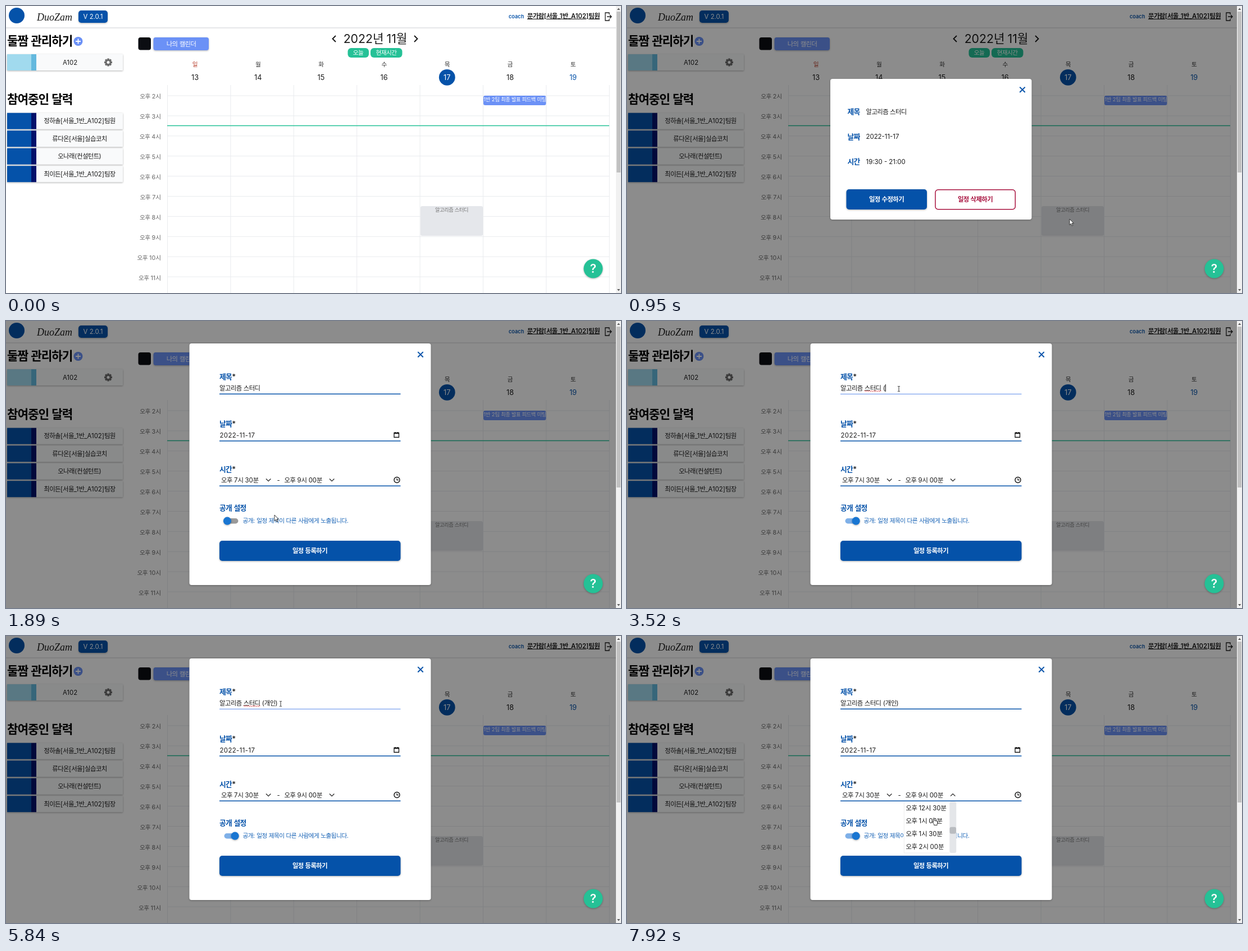
Write an HTML page that moves like this. It is 1095 by 512 pixels and loops after 8 s.

```html
<!DOCTYPE html>
<html lang="ko">
<head>
<meta charset="utf-8">
<style>
  html, body { margin: 0; width: 100%; height: 100%; overflow: hidden; background: #fff; }
  svg { display: block; width: 100%; height: 100%; }
  text { font-family: Inter, 'Noto Sans CJK KR', 'Noto Sans CJK', sans-serif; font-optical-sizing: none; white-space: pre; }
  .hangul { letter-spacing: -.052em; }
  .script { font-family: 'Liberation Serif', serif; font-style: italic; }
  .mid { text-anchor: middle; }
  .end { text-anchor: end; }
  .link { text-decoration: underline; }
  .date { letter-spacing: .035em; }
  .raised { filter: drop-shadow(0 1px 1.5px rgba(0, 0, 0, .3)); }
  .stroke { fill: none; }
</style>
</head>
<body>
<svg id="stage" viewBox="0 0 1095 512"></svg>
<script>
const LOOP = 8000;
const BLUE = '#0552a9', NAVY = '#02116b', SOFT = '#6b91f6', GREEN = '#25c196';
const RED = '#a8123f', INK = '#1b1b1b', GRAY = '#686868';
const BASE = 11.4, SMALL = 10.7, TINY = 9.3, LABEL = 12.8, TITLE = 21.3;

const wrapHangul = s => s.replace(/[ㄱ-ㅎ가-힣]+/g, '<tspan class="hangul">$&</tspan>');

// y is the vertical centre of the line
const text = (x, y, s, size = BASE, fill = INK, cls = '', weight = 400) =>
  `<text x="${x}" y="${y + size * .37}" font-size="${size}" fill="${fill}" class="${cls}" font-weight="${weight}">${wrapHangul(s)}</text>`;
const rect = (x, y, w, h, fill, r = 0, cls = '') =>
  `<rect x="${x}" y="${y}" width="${w}" height="${h}" rx="${r}" fill="${fill}" class="${cls}"/>`;
const circle = (x, y, r, fill, cls = '') =>
  `<circle cx="${x}" cy="${y}" r="${r}" fill="${fill}" class="${cls}"/>`;
const line = (d, color, width = 1) =>
  `<path class="stroke" d="${d}" stroke="${color}" stroke-width="${width}"/>`;
const cross = (x, y, r) => line(`M${x - r} ${y - r}l${2 * r} ${2 * r}m0 ${-2 * r}l${-2 * r} ${2 * r}`, BLUE, 2);
const group = (id, body) => `<g id="${id}">${body}</g>`;
const range = (n, fn) => Array.from({ length: n }, (_, i) => fn(i)).join('');

function header() {
  return rect(0, 38, 1086, 2, '#e6e7e9') +
    circle(19, 17, 14, BLUE) +
    text(55, 19, 'DuoZam', 18, INK, 'script') +
    rect(129, 8, 52, 22, BLUE, 5, 'raised') +
    text(155, 19, 'V 2.0.1', BASE, '#fff', 'mid') +
    text(895, 18.5, 'coach', 9.2, BLUE, '', 600) +
    text(928, 17.5, '문가람[서울_1반_A102]팀원', BASE, INK, 'link', 600) +
    line('M1074 15v-3h-7v14h7v-3M1070 19h8m-3-3l3 3l-3 3', INK, 1.3);
}

function member(name, i) {
  const y = 190.7 + 31.5 * i;
  return rect(2, y, 206, 29, '#f9fafb', 1, 'raised') + rect(2, y, 43, 29, BLUE) +
    rect(45, y, 9, 29, NAVY) + text(131, y + 14.5, name, BASE, INK, 'mid');
}

function sidebar() {
  const teeth = range(8, i => `<rect x="-1.7" y="-7" width="3.4" height="4" transform="rotate(${i * 45})"/>`);
  return text(2, 62.5, '둘짬 관리하기', TITLE, '#000', '', 600) +
    circle(128.5, 63, 8, SOFT) + line('M124 63h9m-4.5-4.5v9', '#fff', 1.8) +
    rect(2, 86, 206, 29, '#f9fafb', 1, 'raised') + rect(2, 86, 43, 29, '#a1daee') + rect(45, 86, 9, 29, '#64b9de') +
    text(114, 100.5, 'A102', BASE, INK, 'mid') +
    `<g transform="translate(182 100.5)" fill="#6b6b6b">${teeth}<circle r="4" class="stroke" stroke="#6b6b6b" stroke-width="3"/></g>` +
    text(2, 166.5, '참여중인 달력', TITLE, '#000', '', 600) +
    ['정하솔[서울_1반_A102]팀원', '류다온[서울]실습코치', '오나래(컨설턴트)', '최이든[서울_1반_A102]팀장'].map(member).join('');
}

function dayHead(i) {
  const x = 336.5 + 112.2 * i, today = i === 4;
  const color = today ? '#fff' : i === 6 ? BLUE : INK;
  return text(x, 104, '일월화수목금토'[i], SMALL, i ? '#333' : '#b8402f', 'mid') +
    (today ? circle(x, 127.3, 14.4, BLUE) : '') +
    text(x, 127, String(13 + i), LABEL, color, 'mid');
}

function calendar() {
  return rect(235.5, 56, 22.5, 22.5, '#0b0d12', 4) +
    rect(262.5, 56, 98.5, 23, SOFT, 4, 'raised') + text(312, 67.3, '나의 캘린더', BASE, '#fff', 'mid') +
    line('M587 53l-5.5 5.5l5.5 5.5M727 53l5.5 5.5l-5.5 5.5', '#111', 1.8) +
    text(657, 58.5, '2022년 11월', TITLE, INK, 'mid') +
    rect(608.5, 75, 37.5, 17, GREEN, 6) + text(627, 83.5, '오늘', SMALL, '#fff', 'mid') +
    rect(649, 75, 56.5, 17, GREEN, 6) + text(677, 83.5, '현재시간', SMALL, '#fff', 'mid') +
    range(7, dayHead) +
    range(8, i => line(`M${287.5 + 112.4 * i} 141V512`, '#e9ebee')) +
    range(10, i => {
      const y = 160 + 35.9 * i;
      return line(`M287.5 ${y}H1074`, '#e9ebee') + text(275.5, y + 1.5, `오후 ${i + 2}시`, SMALL, GRAY, 'end');
    }) +
    line('M287 213.5H1074', GREEN, 1.4) +
    rect(850, 160, 111.5, 17, SOFT, 3) + text(906, 167, '1반 2팀 최종 발표 피드백 미팅', TINY, '#fff', 'mid') +
    rect(738, 357, 111, 53, '#e5e7eb', 3) + text(793.5, 364, '알고리즘 스터디', TINY, '#777', 'mid');
}

function chrome() {
  return circle(1045.5, 468.5, 17, GREEN, 'raised') + text(1045.5, 468.5, '?', 21, '#fff', 'mid', 600) +
    rect(1086, 0, 9, 512, '#f1f1f1') + rect(1087.2, 10, 7, 287, '#c1c1c1') +
    '<path d="M1088 7l2.7-3.5l2.7 3.5zM1088 505l2.7 3.5l2.7-3.5z" fill="#606060"/>';
}

function details() {
  const row = (y, label, value, weight) =>
    text(392.5, y, label, LABEL, BLUE, '', 600) + text(425.5, y, value, BASE, INK, '', weight);
  return rect(362, 130, 358.5, 251, '#fff', 4, 'raised') + cross(704, 149.3, 4.7) +
    row(188.5, '제목', '알고리즘 스터디', 500) +
    row(232.8, '날짜', '2022-11-17', 400) +
    row(277.5, '시간', '19:30 - 21:00', 400) +
    rect(390.5, 327, 143.5, 36, BLUE, 5, 'raised') + text(462, 345, '일정 수정하기', BASE, '#fff', 'mid', 600) +
    `<rect x="549" y="327.8" width="142.3" height="35" rx="5" fill="#fff" stroke="${RED}" stroke-width="1.5"/>` +
    text(620, 345, '일정 삭제하기', BASE, RED, 'mid', 600);
}

function form() {
  const label = (y, s, star = '<tspan fill="#222">*</tspan>') => text(380, y, s + star, LABEL, BLUE, '', 600);
  const underline = y => line(`M380 ${y}H702.5`, BLUE, 1.5);
  return rect(326.5, 40, 430, 431, '#fff', 4, 'raised') + cross(738, 59.8, 4.7) +
    label(99, '제목') + label(183.5, '날짜') + label(264, '시간') + label(333, '공개 설정', '') +
    '<g id="field"></g><path id="titleLine" class="stroke" d="M380 130.3H702.5"/>' +
    line('M422.5 125q1-2 2 0' + 't2 0'.repeat(14), '#d33', .9).replace('<path', '<path id="spelling"') +
    '<rect id="caret" y="113" width="1" height="13" fill="#000"/>' +
    text(380.5, 203.5, '2022-11-17', BASE, INK, 'date') + underline(214) +
    line('M691 199.5h8.5v8h-8.5zM691 200.5h8.5M693 198v2m4.5-2v2', '#111', 1.3) +
    text(383, 283.5, '오후 7시 30분') + line('M463 281.5l4.2 4.2l4.2-4.2', '#222', 1.2) +
    text(485, 283.5, '-', BASE, INK, 'mid') + text(495.5, 283.5, '오후 9시 00분') +
    '<path id="chevron" class="stroke" stroke="#222" stroke-width="1.2"/>' +
    '<circle cx="696" cy="283.5" r="5" class="stroke" stroke="#111" stroke-width="1.4"/>' +
    line('M696 280.5v3.2h3', '#111', 1.2) + underline(294.3) +
    '<rect id="track" x="388.5" y="352" width="25" height="9.5" rx="4.7"/>' +
    '<circle id="knob" cy="356.7" r="7.1" fill="#1976d2" class="raised"/>' +
    text(421.5, 356.3, '공개: 일정 제목이 다른 사람에게 노출됩니다.', SMALL, '#1763b6') +
    rect(380, 392, 322.5, 36, BLUE, 5, 'raised') + text(541, 410, '일정 등록하기', BASE, '#fff', 'mid', 600);
}

const ITEM = 22.8, ITEMS = 48, LIST_TOP = 295.5, LIST_HEIGHT = 91.5;

function timeList() {
  const item = i => {
    const hour = i >> 1;
    return text(496.5, 307 + ITEM * i, `${hour < 12 ? '오전' : '오후'} ${hour % 12 || 12}시 ${i % 2 ? '30' : '00'}분`);
  };
  return `<clipPath id="listClip">${rect(493, LIST_TOP, 94, LIST_HEIGHT, '#fff')}</clipPath>` +
    rect(493, LIST_TOP, 93.5, LIST_HEIGHT, '#fff') +
    `<g clip-path="url(#listClip)"><g id="items">${range(ITEMS, item)}</g></g>` +
    line(`M493.3 ${LIST_TOP}v${LIST_HEIGHT}h81`, '#e8e8ea', .8) +
    rect(574.3, LIST_TOP, 12, LIST_HEIGHT, '#e4e6e9', 3) +
    '<rect id="thumb" x="574.5" width="11.5" height="12" rx="3" fill="#b9bcc0"/>';
}

const pointers =
  '<circle id="ring" cy="1" r="9" fill="#f3ec3f" opacity=".85"/>' +
  '<path id="arrow" d="M0 0v10.5l2.4-2.2l1.7 3.9l1.7-.8l-1.7-3.7h3.3z" fill="#fff" stroke="#222" stroke-width=".9"/>' +
  '<path id="hand" d="M-.6 8.5V1.2q1-1.6 2 0v4l4.6 1.1q1.3.4 1 2l-.8 3.2v2H.7v-1.7l-3.4-4q.4-1.7 2.1.7z" fill="#fff" stroke="#222" stroke-width=".9"/>' +
  '<path id="beam" class="stroke" d="M-2-4.5h1.5l.5.5l.5-.5H2M0-4V4M-2 4.5h1.5l.5-.5l.5.5H2" stroke="#333" stroke-width="1"/>';

const stage = document.getElementById('stage');
stage.innerHTML = header() + sidebar() + calendar() +
  group('dim', rect(0, 0, 1086, 512, 'rgba(0,0,0,.45)')) + chrome() +
  group('details', details()) + group('form', form()) + group('list', timeList()) + group('pointer', pointers);

const el = Object.fromEntries([...stage.querySelectorAll('[id]')].map(e => [e.id, e]));
const show = (name, on) => { el[name].style.display = on ? '' : 'none'; };
const set = (name, attrs) => { for (const k in attrs) el[name].setAttribute(k, attrs[k]); };

// progress 0..1 in n even jumps, the first at t0 and the last at t1
const stepped = (t, t0, t1, n) =>
  t < t0 ? 0 : t >= t1 ? 1 : (Math.floor((t - t0) / (t1 - t0) * (n - 1)) + 1) / n;
const latest = (list, t) => list.filter(entry => entry[0] <= t).pop();
const within = (t, a, b) => t >= a && t < b;

// start, end, jumps, from, bend, to
const moves = [
  [0, 610, 6, [1160, 510], [930, 245], [788, 380]],
  [1210, 1500, 5, [788, 380], [620, 350], [470, 347]],
  [1750, 1890, 3, [470, 347], [474, 347], [478, 346]],
  [2040, 2450, 7, [478, 346], [512, 250], [484, 121]],
  [5840, 6370, 9, [484, 121], [507, 110], [526, 290]],
  [7030, 7180, 3, [526, 290], [540, 310], [546, 324]]
];
const shapes = [
  [0, ''], [260, 'arrow'], [750, 'hand'], [950, 'arrow'], [1490, 'hand'], [1820, 'arrow'],
  [2380, 'beam'], [5970, 'arrow'], [6300, 'hand']
];
const clicks = [[750, 950], [1560, 1700], [2590, 2710], [6640, 6710]];
const typed = [
  [0, ''], [3110, ' '], [3520, ' ('], [4250, ' (ㄱ'], [4380, ' (가'], [4510, ' (개'],
  [4650, ' (개이'], [4710, ' (개인'], [5240, ' (개인)']
];

function drawPointer(t) {
  const [start, end, n, a, b, c] = latest(moves, t);
  const p = stepped(t, start || 260, end, n), q = 1 - p;
  const [x, y] = [0, 1].map(i => q * q * a[i] + 2 * p * q * b[i] + p * p * c[i]);
  set('pointer', { transform: `translate(${x} ${y})` });
  const shape = latest(shapes, t)[1];
  ['arrow', 'hand', 'beam'].forEach(name => show(name, name === shape));
  show('ring', clicks.some(([from, to]) => within(t, from, to)));
}

let fieldText;
function drawForm(t) {
  const value = '알고리즘 스터디' + latest(typed, t)[1];
  if (value !== fieldText) el.field.innerHTML = text(380, 119.3, fieldText = value);
  const focused = within(t, 2650, 6710);
  set('titleLine', { stroke: focused ? '#5b8bea' : BLUE, 'stroke-width': focused ? 1 : 1.5 });
  show('spelling', focused);
  show('caret', within(t, 2650, 5840) && !within(t, 4050, 4250));
  set('caret', { x: 380 + el.field.firstChild.getComputedTextLength() });
  set('knob', { cx: t < 1970 ? 394 : t < 2040 ? 404 : 407.7 });
  set('track', { fill: t < 1970 ? '#9a9a9a' : '#7fb0e8' });
  set('chevron', { d: t < 6710 ? 'M576 281.5l4.2 4.2l4.2-4.2' : 'M576 285.7l4.2-4.2l4.2 4.2' });
}

function drawList(t) {
  const scroll = ITEM * (15 * stepped(t, 7230, 7500, 5) + 10 * stepped(t, 7700, 7920, 4));
  set('items', { transform: `translate(0 ${-scroll})` });
  set('thumb', { y: LIST_TOP + scroll / (ITEM * ITEMS - LIST_HEIGHT) * (LIST_HEIGHT - 12) });
}

function draw(now) {
  const t = now % LOOP;
  show('dim', t >= 950);
  show('details', within(t, 950, 1820));
  show('form', t >= 1820);
  show('list', t >= 6710);
  drawForm(t);
  drawList(t);
  drawPointer(t);
  requestAnimationFrame(draw);
}
draw(0);
</script>
</body>
</html>
```
